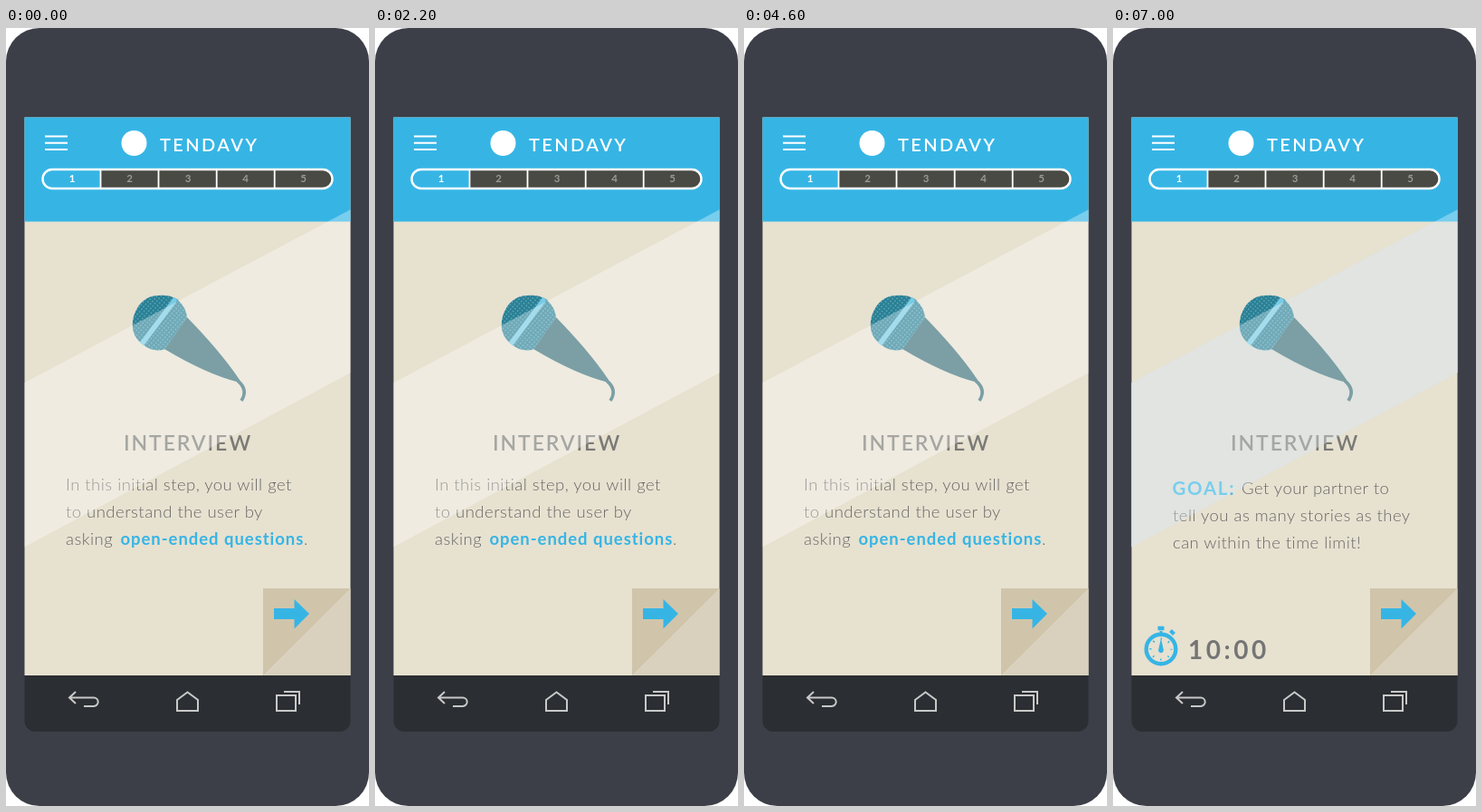
Animation of 401x858 px, one loop 9 s. Source, as an HTML page:

```html
<!DOCTYPE html>
<html lang="en">
<head>
<meta charset="utf-8">
<title>Interview step</title>
<style>
html, body { margin: 0; width: 100%; height: 100%; overflow: hidden; background: #fff; }
svg { display: block; width: 100vw; height: 100vh; }
text { font-family: Lato, "Open Sans", sans-serif; }

.body { font-size: 18.5px; font-weight: 300; letter-spacing: .47px; fill: #666; }
.body .b { font-weight: 700; letter-spacing: .95px; }
.note { letter-spacing: .68px; }
.note .b { letter-spacing: 1.05px; fill: #5c5c5c; }
.body .blue { fill: #36b5e5; }
.title { font-size: 20px; font-weight: 600; letter-spacing: 2.4px; fill: #fff; }
.head { font-size: 23px; font-weight: 600; letter-spacing: 1.9px; fill: #7a7a76; }
.num { font-size: 11.5px; font-weight: 700; text-anchor: middle; fill: #9b9b95; }
.goal { font-size: 20.5px; font-weight: 700; letter-spacing: 1.7px; fill: #36b5e5; }
.time { font-size: 28px; font-weight: 700; letter-spacing: 3.5px; fill: #757575; }
.line { fill: none; stroke: #c8c8c8; stroke-width: 2; }
.tap rect { fill: rgba(23,193,247,.57); stroke: rgba(50,150,180,.6); stroke-width: 2; }

/* one 9 s loop, hard cuts */
.intro, .goalPage, .pop, .tap { animation: 9s step-end infinite; }
.goalPage, .pop, .tap { visibility: hidden; }
.intro { animation-name: intro; }
.goalPage { animation-name: goalPage; }
.pop { animation-name: pop; }
.t1 { animation-name: tapLink; }
.t2 { animation-name: tapClose; }
.t3 { animation-name: tapNext; }
@keyframes intro { 0% { visibility: visible } 77.7777%, 100% { visibility: hidden } }
@keyframes goalPage { 0% { visibility: hidden } 77.7777%, 100% { visibility: visible } }
@keyframes pop { 0% { visibility: hidden } 26.6666% { visibility: visible } 51.1111%, 100% { visibility: hidden } }
@keyframes tapLink { 0% { visibility: hidden } 22.2222% { visibility: visible } 24.4444%, 100% { visibility: hidden } }
@keyframes tapClose { 0% { visibility: hidden } 48.8888% { visibility: visible } 51.1111%, 100% { visibility: hidden } }
@keyframes tapNext { 0% { visibility: hidden } 73.3333% { visibility: visible } 75.5555%, 100% { visibility: hidden } }
</style>
</head>
<body>
<svg viewBox="0 0 401 858" preserveAspectRatio="none">
  <defs>
    <pattern id="mesh" width="3.6" height="3.6" patternUnits="userSpaceOnUse" patternTransform="rotate(40)">
      <rect width="3.6" height="3.6" fill="#297f94"/>
      <rect width="1.8" height="1.8" fill="#539fb1"/>
    </pattern>
    <clipPath id="screen"><rect x="20.5" y="98.5" width="360" height="615.5"/></clipPath>
    <clipPath id="bar"><rect x="40.5" y="156" width="320" height="21" rx="10.5"/></clipPath>
  </defs>

  <!-- phone -->
  <rect width="401" height="858" rx="37" fill="#3c3f48"/>
  <path d="M20.5 714H380.5V764a12 12 0 0 1-12 12H32.5a12 12 0 0 1-12-12Z" fill="#2b2e32"/>
  <g class="line">
    <path d="M77 732L70 738.5L77 745M70 738.5H97a4.7 4.7 0 0 1 0 9.4H86"/>
    <path d="M189 741L200.5 732.5L212 741V753H189Z"/>
    <path d="M299 736H320V753H299ZM307 732H324V746"/>
  </g>

  <g clip-path="url(#screen)">
    <rect x="20" y="98" width="361" height="617" fill="#e7e1d0"/>
    <path class="goalPage" d="M20 391.5L355.5 213.5H381V380L20 572.5Z" fill="#d2d7d1"/>

    <!-- header -->
    <rect x="20" y="98" width="361" height="115.5" fill="#36b5e5"/>
    <path d="M43 119.5H68M43 126.8H68M43 134H68" stroke="#fff" stroke-width="2"/>
    <circle cx="141.5" cy="127" r="14" fill="#fff"/>
    <text class="title" x="170" y="136">TENDAVY</text>
    <rect x="104.5" y="156" width="256" height="21" fill="#4a4a45" clip-path="url(#bar)"/>
    <path d="M104.5 156v21m64-21v21m64.2-21v21m64-21v21" stroke="#fff" stroke-width="1.8"/>
    <rect x="40.5" y="156" width="320" height="21" rx="10.5" fill="none" stroke="#fff" stroke-width="2.4"/>
    <g class="num">
      <text x="73" y="170" style="fill:#fff">1</text>
      <text x="136.5" y="170">2</text>
      <text x="201" y="170">3</text>
      <text x="264.5" y="170">4</text>
      <text x="328.5" y="170">5</text>
    </g>

    <!-- microphone -->
    <path d="M200 319Q238 358 258 388L256.500 390.500Q222 382 175 354Z" fill="#3a7078"/>
    <path d="M256 389Q268 399 260 411" fill="none" stroke="#3a7078" stroke-width="3.6"/>
    <path d="M189 299Q199 308 200 319L175 354.5Q162 358 151 349Q136 338 141 318Q147 299 163 295.500Q179 293 189 299Z" fill="url(#mesh)"/>
    <path d="M150 348.5L187.5 298.5" stroke="#79cbe4" stroke-width="5.5"/>

    <text class="head" x="130" y="466">INTERVIEW</text>

    <!-- page corner -->
    <path d="M284 618H381L284 714.5Z" fill="#d0c5ab"/>
    <path d="M381 618V715H284Z" fill="#d9d0be"/>
    <path d="M296 640H318.5V630L335 646L318.5 662.5V652H296Z" fill="#36b5e5"/>

    <g class="body intro">
      <text x="66" y="510">In this initial step, you will get</text>
      <text x="66" y="540">to understand the user by</text>
      <text x="66" y="570">asking</text>
      <text class="b blue" x="126.5" y="570">open-ended questions</text>
      <text x="329" y="570">.</text>
    </g>

    <g class="goalPage">
      <text class="goal" x="65.5" y="514.5">GOAL:</text>
      <g class="body">
        <text x="142" y="514">Get your partner to</text>
        <text x="66" y="544">tell you as many stories as they</text>
        <text x="66" y="574">can within the time limit!</text>
      </g>
      <g fill="none" stroke="#36b5e5">
        <circle cx="53" cy="685" r="16.3" stroke-width="4.4"/>
        <circle cx="53" cy="685" r="11.5" stroke-width="2.2" stroke-dasharray="1.5 7.532" stroke-dashoffset=".75"/>
        <path d="M53 665V668" stroke-width="3"/>
        <path d="M49.5 662H56.5" stroke-width="4.5"/>
        <path d="M63.5 664.5L67.5 668.5" stroke-width="4"/>
      </g>
      <path d="M53 673L55.8 685.5a2.900 2.900 0 1 1-5.600 0Z" fill="#36b5e5"/>
      <text class="time" x="83" y="696">10:00</text>
    </g>

    <!-- help bubble -->
    <g class="pop">
      <rect x="20" y="98" width="361" height="617" opacity=".5"/>
      <rect x="20.5" y="266" width="360" height="249" rx="38" fill="#fff"/>
      <path d="M135 513C134 541 144 564 169 573.5C159 556 157 538 160 513Z" fill="#fff"/>
      <g class="body note">
        <text x="51.5" y="332.5">An</text>
        <text class="b blue" x="80" y="332.5">open-ended question</text>
        <text x="281" y="332.5">doesn't</text>
        <text x="51.5" y="352.5">have a just one answer, like</text>
        <text class="b" x="293" y="352.5">Yes</text>
        <text x="331" y="352.5">or</text>
        <text class="b" x="51.5" y="372.5">No</text>
        <text x="77" y="372.5">.</text>
        <text x="51.5" y="412.5">Open-ended questions start with</text>
        <text x="51.5" y="432.5">words like</text>
        <text class="b" x="144" y="432.5">What? Why?</text>
        <text x="261" y="432.5">or</text>
        <text class="b" x="284" y="432.5">Why</text>
        <text class="b" x="51.5" y="452.5">not</text>
        <text x="81" y="452.5">?</text>
      </g>
      <text x="351.5" y="298" text-anchor="middle" font-size="21" font-weight="700" fill="#5c5c5c">X</text>

      <!-- dinosaur -->
      <path d="M309 535L325 523L334 547L320 550ZM330 545L360 543L353 570L335 568ZM340 568L369 580L347 600L338 595ZM343 598L357 615L332 629ZM340 633L358 630L355 653ZM350 653L371 659L363 681ZM362 677L381 675V696Z" fill="#b05c6d"/>
      <path d="M202 610C201 590 211 565 221 555C238 535 265 528 292 529C316 530 334 541 340 560C346 580 342 604 332 627C345 638 354 655 361 674Q367 690 381 697V715H268Q270 706 284 705Q285 688 291 672L303 651C284 658 256 658 236 652C219 646 211 638 209 630C226 633 247 633 267 628C284 623 293 616 296 608C270 613 232 615 202 610Z" fill="#70d6e7"/>
      <path d="M291 673Q282 690 284 704Q300 706 310 695Z" fill="#e6d397"/>
      <path d="M312 684Q311 664 324 664Q336 664 335 685Q333 698 325 703Q310 712 292 714H276Q300 708 308 700Q312 694 312 684Z" fill="#5bc0d9"/>
      <path d="M303 651Q320 649 328 636" fill="none" stroke="#4aa5bb" stroke-width="1.3"/>
      <circle cx="234" cy="561" r="12" fill="#fff"/>
      <circle cx="236" cy="562" r="9.8" fill="#3d392f"/>
      <circle cx="290.5" cy="571.5" r="12" fill="#fff"/>
      <circle cx="293" cy="573" r="9.8" fill="#3d392f"/>
      <path d="M213 593Q214 597 218 595.5ZM248 598Q250 593 257 595Q259 600 252 601Q255 597 248 598Z" fill="#377f8d"/>
    </g>

    <!-- screen glare -->
    <path d="M20 391.5L381 200V380L20 572.5Z" fill="#fff" opacity=".33"/>

    <g class="tap t1"><rect x="124" y="557" width="209" height="17"/></g>
    <g class="tap t2"><rect x="338" y="277" width="28" height="28"/></g>
    <g class="tap t3"><rect x="287" y="621" width="60" height="60"/></g>
  </g>
</svg>
</body>
</html>
```
